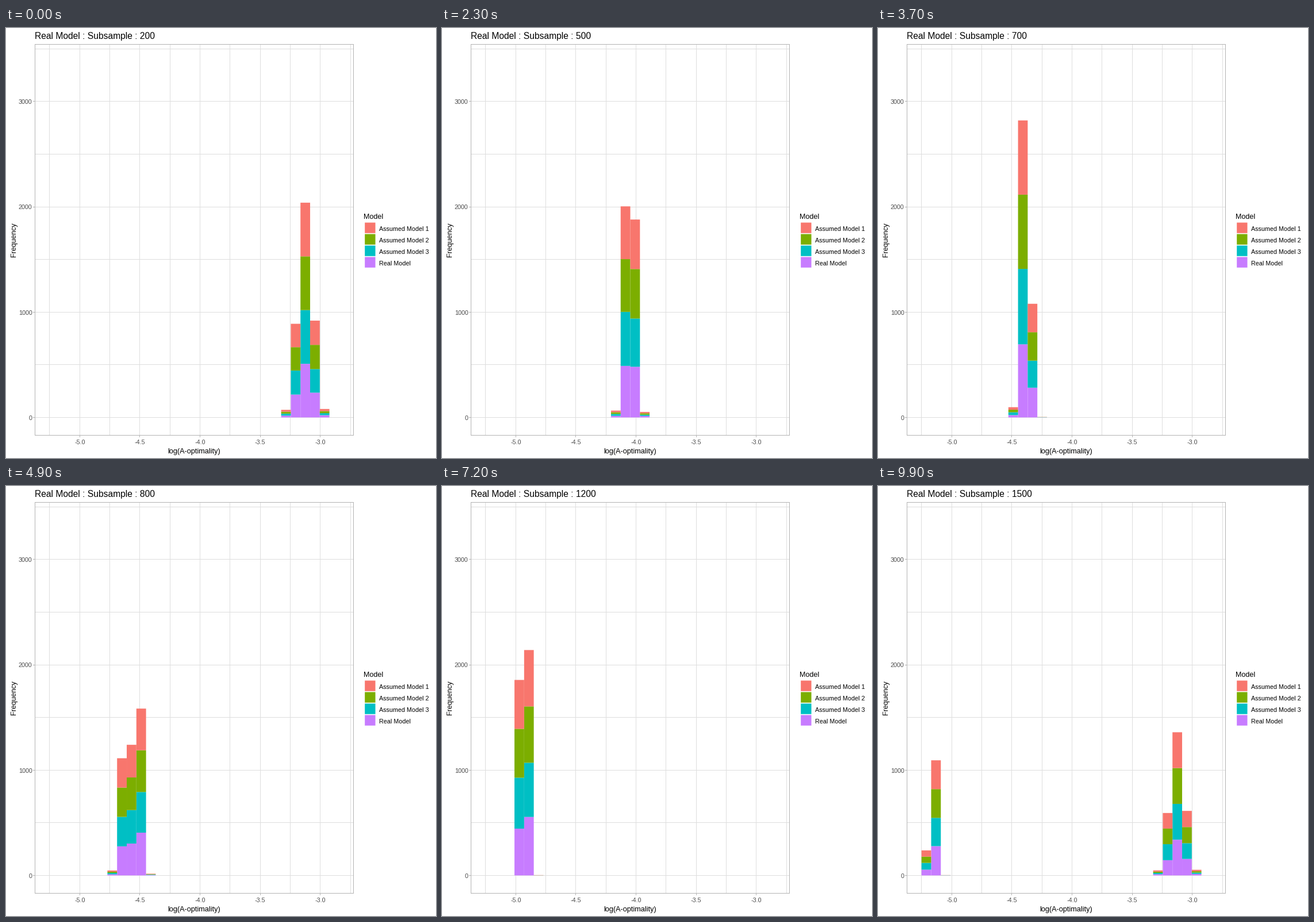
These frames come from a looping animation (748x748 px, 10000 ms). A matplotlib script:

```python
import math

import numpy as np
import matplotlib.pyplot as plt
from matplotlib.animation import FuncAnimation
from matplotlib.collections import PolyCollection
from matplotlib.patches import Rectangle

W = H = 748
DPI = 100
FRAMES, INTERVAL = 100, 100
BINS, DRAWS = 30, 1000
GRID, EDGE, TICK_TEXT = "#DEDEDE", "#B3B3B3", "#4D4D4D"
MODELS = {
    "Assumed Model 1": "#F8766D",
    "Assumed Model 2": "#7CAE00",
    "Assumed Model 3": "#00BFC4",
    "Real Model": "#C77CFF",
}
COLORS = list(MODELS.values())[::-1]  # stacked from the bottom up
SHIFTS = (0.015, -0.015, 0, 0)        # offset of each model's mean, in bins
SIZES = range(200, 1501, 100)
STARTS = [4, 12, 20, *range(28, 99, 7)]


def px(v):
    return 546.9 + (v + 3) * 209.3


def py(count):
    return 677.4 - 0.1832 * count


def normal_cdf(z):
    return 0.5 * (1 + math.erf(z / math.sqrt(2)))


def bin_counts(n, shift):
    """Histogram of normal draws whose spread shrinks as 1 / sqrt(n)."""
    u = math.log(n / 200)
    mean = 26.01 - 12.62 * u + 0.04 * u * u + shift
    sd = 10.25 / math.sqrt(n)
    cdf = [normal_cdf((k - 0.5 - mean) / sd) for k in range(BINS + 1)]
    return np.round(DRAWS * np.diff(cdf))


def stack_levels(n):
    counts = [bin_counts(n, s) for s in SHIFTS]
    return np.cumsum([np.zeros(BINS), *counts], axis=0)


LEVELS = [stack_levels(n) for n in SIZES]


def pose(frame):
    """Return the stack levels and the subsample size in the title."""
    k = sum(s <= frame for s in STARTS)
    if k == 0:
        return LEVELS[0], SIZES[0]
    steps = 4 if k <= 3 else 3
    p = min(1, (frame - STARTS[k - 1] + 1) / steps)
    nxt = k % len(SIZES)
    levels = (1 - p) * LEVELS[k - 1] + p * LEVELS[nxt]
    return levels, SIZES[nxt] if p == 1 else SIZES[k - 1]


fig = plt.figure(figsize=(W / DPI, H / DPI), dpi=DPI, facecolor="white")
ax = fig.add_axes([0, 0, 1, 1])
ax.set(xlim=(0, W), ylim=(H, 0))
ax.axis("off")


def box(x, y, w, h, color, z=1):
    ax.add_patch(Rectangle((x, y), w, h, fc=color, lw=0, snap=False, zorder=z))


def label(x, y, text, size, color="black", **kw):
    return ax.text(x, y, text, fontsize=size * 72 / DPI, color=color,
                   family="Liberation Sans", **kw)


# panel grid
for v in np.arange(-5.25, -2.7, 0.25):
    box(int(px(v)), 29, 1, 679, GRID)
for c in range(0, 3501, 500):
    box(51, int(py(c)), 553, 1, GRID)

# axes
for v in np.arange(-5, -2.9, 0.5):
    box(int(px(v)), 709, 1, 3, EDGE, 3)
    label(px(v), 724, f"{v:.1f}", 10.8, TICK_TEXT, ha="center")
for c in range(0, 3001, 1000):
    box(47, int(py(c)), 3, 1, EDGE, 3)
    label(45.5, py(c) + 4.4, str(c), 10.8, TICK_TEXT, ha="right")
for x in (50, 604):
    box(x, 28, 1, 681, EDGE, 3)
for y in (28, 708):
    box(50, y, 555, 1, EDGE, 3)
label(327.5, 740, "log(A-optimality)", 12.6, ha="center")
label(17.5, 368, "Frequency", 12.6, ha="center", va="baseline", rotation=90,
      rotation_mode="anchor")

# legend
label(622.5, 331.5, "Model", 12.6)
for i, (name, color) in enumerate(MODELS.items()):
    box(624.2, 338.5 + 19.97 * i, 18.33, 18.33, color)
    label(649, 353 + 20 * i, name, 10.8)

title = label(50, 19, "", 15.6)
edges = 75.7 + 16.79 * np.arange(BINS + 1)
bars = PolyCollection([], linewidths=0, snap=False, zorder=2)
ax.add_collection(bars, autolim=False)


def draw(frame):
    levels, size = pose(frame)
    ys = py(levels)
    quads, fills = [], []
    for m, color in enumerate(COLORS):
        for x0, x1, y0, y1 in zip(edges, edges[1:], ys[m], ys[m + 1]):
            if y1 < y0:
                quads.append([(x0, y0), (x1, y0), (x1, y1), (x0, y1)])
                fills.append(color)
    bars.set_verts(quads)
    bars.set_facecolor(fills)
    title.set_text(f"Real Model : Subsample : {size}")
    return bars, title


anim = FuncAnimation(fig, draw, frames=FRAMES, interval=INTERVAL,
                     init_func=lambda: draw(0), repeat=True, repeat_delay=0,
                     cache_frame_data=False)
plt.show()
```
